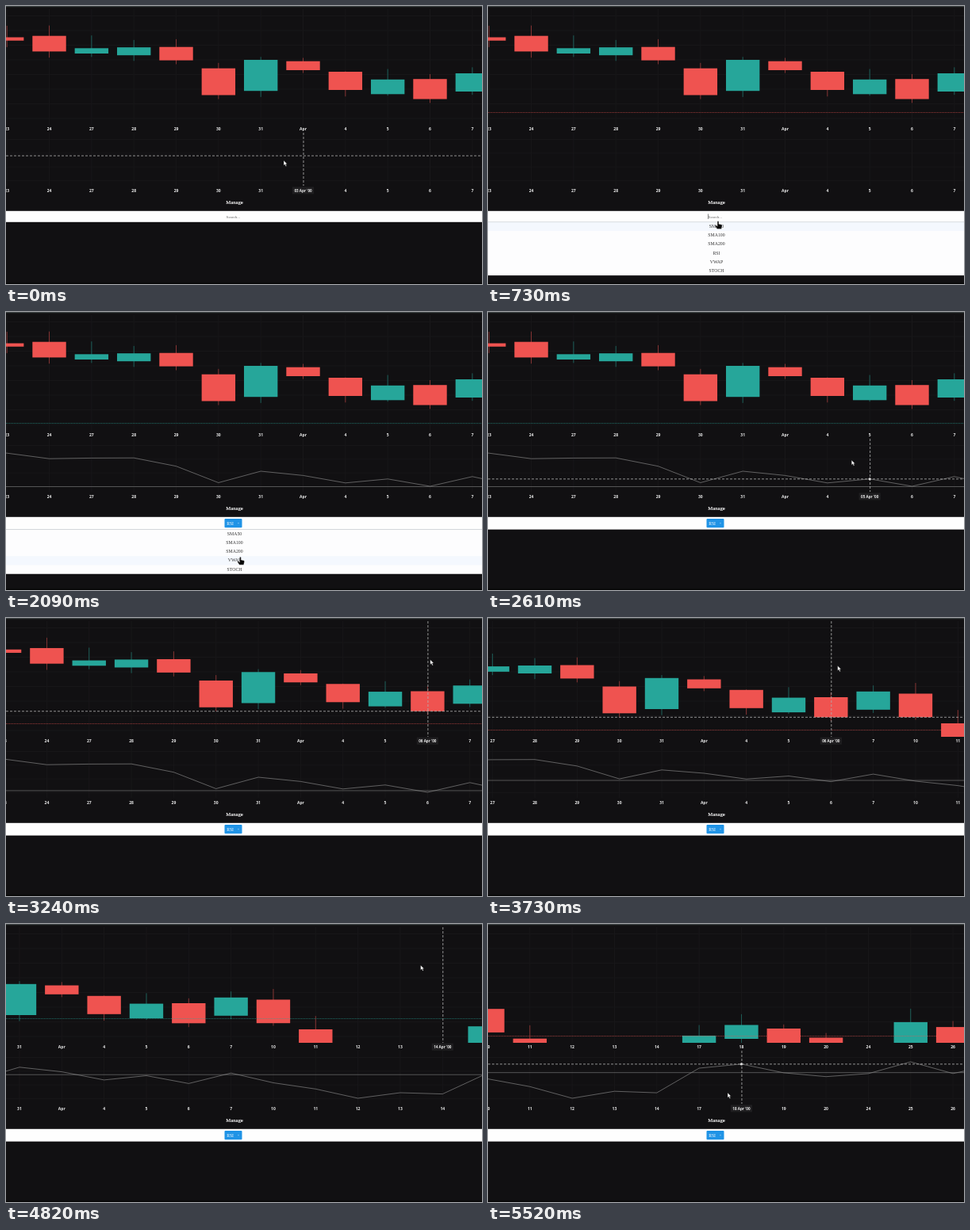
These frames come from a looping animation (600x351 px, 5560 ms). An HTML page:

```html
<!DOCTYPE html>
<html lang="en">
<head>
<meta charset="utf-8">
<title>Candles with indicator picker</title>
<style>
html, body { margin: 0; width: 100%; height: 100%; overflow: hidden; background: #111012; }
svg { display: block; width: 600px; height: 351px; }
text { text-anchor: middle; }
.axis { font: 700 5px "Open Sans", "Noto Sans", sans-serif; fill: #ececec; }
.serif { font-family: "Liberation Serif", "Noto Serif", serif; }
</style>
</head>
<body>
<svg viewBox="0 0 600 351">
  <defs>
    <clipPath id="top"><rect y="4" width="600" height="146"/></clipPath>
    <clipPath id="low"><rect y="160" width="600" height="67"/></clipPath>
  </defs>
  <rect width="600" height="351" fill="#111012"/>
  <rect width="600" height="1.2" fill="#3b4142"/>
  <rect y="349.6" width="600" height="1.4" fill="#050505"/>
  <g id="chart"></g>
  <text class="serif" x="288" y="250.3" font-size="6.7" fill="#fff" stroke="#fff" stroke-width=".15">Manage</text>
  <g id="picker"></g>
  <g id="cursor"></g>
</svg>
<script>
const LOOP = 5560, STEP = 53.33, WIDTH = 600, LEAD = 25;
const RED = '#ef5350', TEAL = '#26a69a';
const OPEN = 480, PICK = 2000, CLOSE = 2420;

const byId = id => document.getElementById(id);
const clamp = (v, lo, hi) => Math.min(hi, Math.max(lo, v));
const noise = n => { const s = Math.sin(n * 127.1) * 43758.5453; return s - Math.floor(s); };

// trading days from 22 March 2000, without weekends and Good Friday
function tradingDays(count) {
  const list = [], date = new Date(Date.UTC(2000, 2, 22));
  for (; list.length < count; date.setUTCDate(date.getUTCDate() + 1)) {
    const day = date.getUTCDate(), april = date.getUTCMonth() === 3;
    const closed = date.getUTCDay() % 6 === 0 || (april && day === 21);
    if (!closed) list.push({ day, month: april ? 'Apr' : 'Mar' });
  }
  return list;
}

// open and close as heights on the stage; wicks are seeded
const bodies = [
  [30, 35.2], [39.5, 43.7], [37.7, 57.4], [60, 53.3], [62.2, 52.2], [51.7, 68.6], [78.7, 112.5],
  [107.2, 68], [69.7, 81], [83, 106], [111.3, 92.8], [92.2, 117.5], [108, 85], [87.7, 117.4],
  [125.2, 142.4], [165, 192], [185, 177], [172, 183], [160, 121.4], [125.5, 108], [112.5, 131],
  [124, 141.5], [140, 134.5], [134, 104.4], [110.6, 131], [130, 107]
];
const days = tradingDays(bodies.length);
const bars = bodies.map(([open, close], i) => ({
  ...days[i], open, close,
  top: Math.min(open, close),
  bottom: Math.max(open, close),
  high: Math.min(open, close) - 18 * noise(i + 1),
  low: Math.max(open, close) + 10 * noise(i + 40),
  color: close > open ? RED : TEAL,
  name: i && days[i].month !== days[i - 1].month ? days[i].month : days[i].day
}));

// relative strength of the closes with smoothed gains and losses
function relativeStrength(period, gain, loss) {
  return bars.map((bar, i) => {
    if (i) {
      const rise = bars[i - 1].close - bar.close;
      gain = (gain * (period - 1) + Math.max(rise, 0)) / period;
      loss = (loss * (period - 1) + Math.max(-rise, 0)) / period;
    }
    return 100 * gain / (gain + loss);
  });
}
const rsi = relativeStrength(7, 26.3, 4.8);

// pointer stops: time, x, y
const path = [
  [0, 350, 195], [60, 351, 201], [420, 290, 265], [640, 289, 266], [1450, 298, 318], [1760, 298, 319],
  [1950, 294, 311], [2150, 296, 309], [2610, 458, 187], [2870, 512, 168], [3050, 534.7, 52.5],
  [3250, 534.7, 52.5], [3730, 441, 60.3], [4375, 230.5, 60.3], [4820, 522, 52], [4890, 560, 50],
  [4940, 560, 50], [5330, 222.5, 61.7], [5520, 302, 213]
];
const drags = [[3250, 4375], [4940, 5330]];
// time, level and colour of the latest price
const ticks = [
  [580, 134, RED], [1980, 140.5, TEAL], [3000, 133.7, RED],
  [3950, 109.7, TEAL], [4550, 111.2, TEAL], [5100, 121.5, RED]
];

function pointer(t) {
  const n = path.findIndex(p => p[0] > t);
  if (n < 0) return path[path.length - 1].slice(1);
  const [a, b] = [path[n - 1], path[n]];
  const f = (t - a[0]) / (b[0] - a[0]);
  return [1, 2].map(j => a[j] + (b[j] - a[j]) * f);
}

function panAt(t) {
  const pan = [0, 0];
  for (const [from, to] of drags) {
    const a = pointer(from), b = pointer(clamp(t, from, to));
    pan.forEach((_, j) => { pan[j] += b[j] - a[j]; });
  }
  return pan;
}

const rect = (x, y, w, h, fill, extra = '') =>
  `<rect x="${x}" y="${y}" width="${w}" height="${h}" fill="${fill}" ${extra}/>`;
const line = (x1, y1, x2, y2, stroke, extra = '') =>
  `<line x1="${x1}" y1="${y1}" x2="${x2}" y2="${y2}" stroke="${stroke}" ${extra}/>`;
const across = (y, stroke, extra) => line(0, y, WIDTH, y, stroke, extra);
const label = (x, y, s, extra = '') => `<text class="axis" x="${x}" y="${y}" ${extra}>${s}</text>`;
const clip = (id, body) => `<g clip-path="url(#${id})">${body}</g>`;

function drawChart(t) {
  const [dx, dy] = panAt(t + LEAD);
  const xOf = i => 1.2 + STEP * (i - 1) + dx;
  const showRsi = t >= PICK;

  // the lower pane rescales to the bars in and near the view
  const near = rsi.filter((_, i) => xOf(i) > -133 && xOf(i) < 690);
  const min = Math.min(...near);
  const scale = 46 / (Math.max(...near) - min);
  const rsiY = v => 220 - (v - min) * scale;

  let grid = '', candles = '', lower = '', axes = '';
  for (let y = 12.5; y < 150; y += 18.5) grid += across(y, '#171618');
  for (let y = 168.5; y < 227; y += 17.3) lower += across(y, '#171618');
  bars.forEach((bar, i) => {
    const x = xOf(i);
    grid += line(x, 4, x, 150, '#181719');
    lower += line(x, 160, x, 227, '#181719');
    candles += line(x, bar.high + dy, x, bar.low + dy, bar.color, 'stroke-width=".8" opacity=".65"') +
      rect(x - 21.2, bar.top + dy, 42.4, bar.bottom - bar.top, bar.color);
    axes += label(x, 156.9, bar.name) + label(x, 234.6, bar.name);
  });
  let upper = grid + candles;

  const tick = ticks.filter(k => k[0] <= t).pop();
  if (tick) {
    const [, price, tint] = tick;
    upper += across(Math.floor(price + dy) + 0.5, tint, 'stroke-dasharray="1 1" opacity=".6"');
    if (showRsi) {
      const points = rsi.map((v, i) => `${xOf(i).toFixed(1)},${rsiY(v).toFixed(1)}`).join(' ');
      lower += across(rsiY(53.7 - 0.325 * (price - 109.7)), '#666', 'stroke-width=".8"') +
        `<polyline points="${points}" fill="none" stroke="#8c8c8c" stroke-width=".65"/>`;
    }
  }

  // the crosshair runs slightly ahead of the drawn pointer and snaps to the bars
  const [cx, cy] = pointer(t + LEAD);
  const inTop = cy > 4 && cy < 150, inLow = cy > 160 && cy < 227;
  if (inTop || inLow) {
    const i = clamp(Math.round((cx - xOf(0)) / STEP), 0, bars.length - 1);
    const bar = bars[i], x = xOf(i);
    const y = inTop ? bar.close + dy : showRsi ? rsiY(rsi[i]) : cy - 8.5;
    const dash = 'stroke-dasharray="3 2" stroke-width=".8"';
    const cross = line(x + 0.5, inTop ? 4 : 160, x + 0.5, inTop ? 150 : 227, '#b0b0b0', dash) +
      across(y, '#b0b0b0', dash);
    if (inTop) upper += cross;
    else lower += cross + (showRsi ? `<circle cx="${x}" cy="${y}" r="1.6" fill="#d8d8d8"/>` : '');
    const ly = inTop ? 150.7 : 228.4;
    const date = `${String(bar.day).padStart(2, '0')} ${bar.month} '00`;
    axes += rect(x - 13.6, ly, 27.2, 9, '#1f1e20') + label(x, ly + 6.3, date, 'style="font-size:4.6px"');
  }
  byId('chart').innerHTML = clip('top', upper) + clip('low', lower) + axes;
}

function drawPicker(t, py) {
  const picked = t >= PICK, open = t >= OPEN && t < CLOSE;
  const bottom = picked ? 274.6 : 272.8;
  const text = (x, y, s, size, fill) =>
    `<text class="serif" x="${x}" y="${y}" font-size="${size}" fill="${fill}">${s}</text>`;
  let out = rect(0, 258.8, WIDTH, bottom - 258.8, '#fefefe');
  if (picked) {
    out += rect(275.5, 261, 22, 11.2, '#1f93e6', 'rx="1"') +
      text(282.6, 268.5, 'RSI', 5.6, '#fff') + text(293, 268.3, '×', 5, '#cfe8fb');
  } else {
    out += text(286.3, 267.6, 'Search...', 5, '#666');
    if (open) out += line(277.5, 262.5, 277.5, 269, '#555', 'stroke-width=".7"');
  }
  if (open) {
    const rows = ['SMA50', 'SMA100', 'SMA200', 'RSI', 'VWAP', 'STOCH'].filter(r => !picked || r !== 'RSI');
    const H = 11.23;
    const active = clamp(Math.floor((py - bottom) / H), 0, rows.length - 1);
    out += rect(0, bottom, WIDTH, rows.length * H, '#fdfdfe') +
      rect(0, bottom + active * H, WIDTH, H, '#f4f8fe') +
      across(bottom, '#dfe3e8', 'stroke-width=".7"');
    rows.forEach((r, i) => { out += text(288, bottom + i * H + 7.2, r, 5.8, '#333'); });
  }
  byId('picker').innerHTML = out;
}

function drawCursor(x, y) {
  const shape = y > 258
    ? '<path d="M-.9 .2Q0-1 .9 .2V3.4L4.4 4.2Q5.4 4.6 5 6.2L4.2 9.6H-1.2L-3.7 6Q-3.6 4.8-2.4 5.2L-.9 6.3Z" fill="#080808" stroke="#fff" stroke-width=".3"/>'
    : '<path d="M0 0V6.2L1.5 4.9L2.6 7.4L3.7 6.9L2.7 4.5H4.5Z" fill="#fff" stroke="#111" stroke-width=".4"/>';
  byId('cursor').innerHTML = `<g transform="translate(${x} ${y})">${shape}</g>`;
}

function render(t) {
  const [x, y] = pointer(t);
  drawChart(t);
  drawPicker(t, y);
  drawCursor(x, y);
}

const start = performance.now();
function frame() {
  render((performance.now() - start) % LOOP);
  requestAnimationFrame(frame);
}
render(0);
requestAnimationFrame(frame);
</script>
</body>
</html>
```
